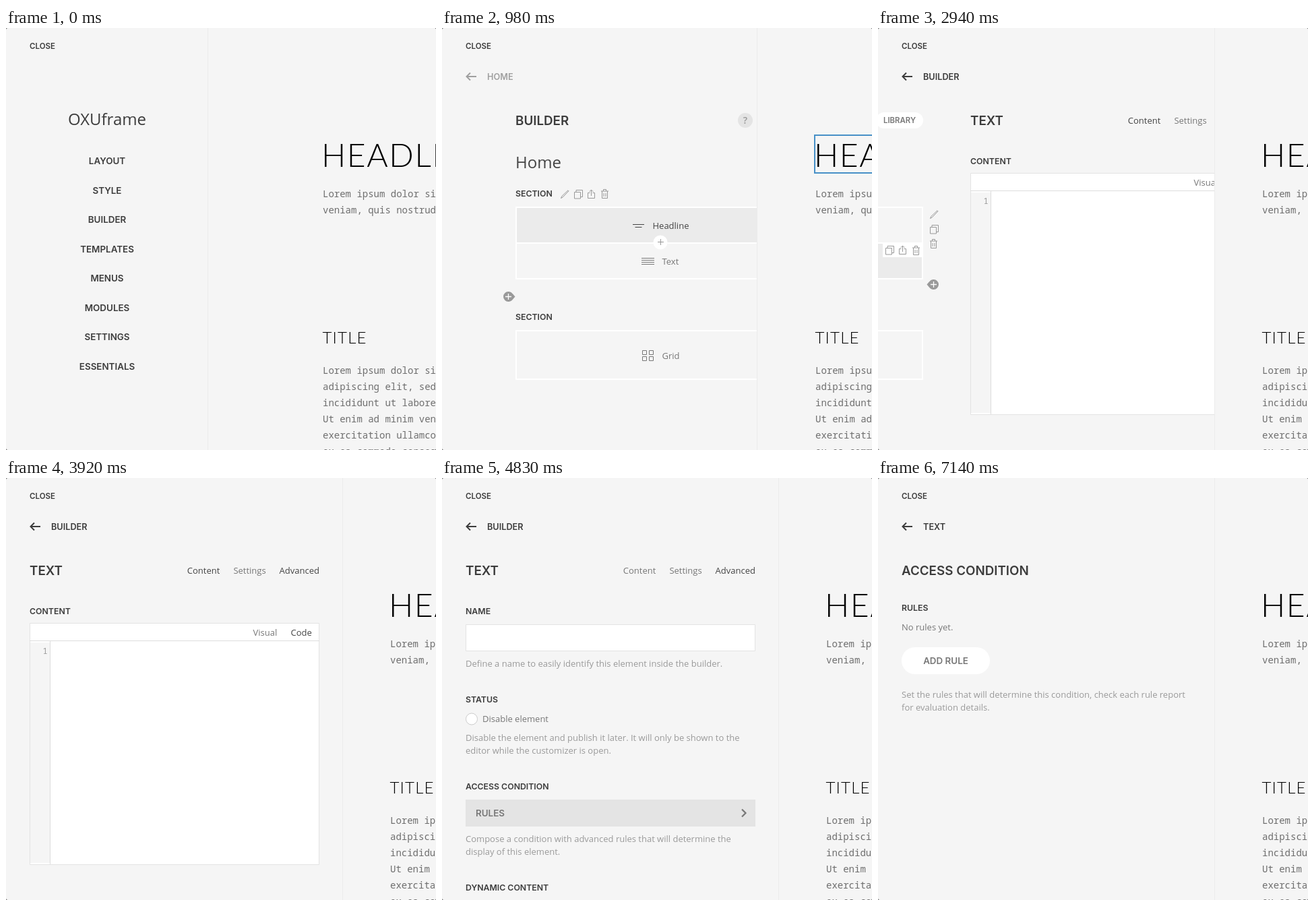
Recreate the animation shown at these times as an HTML page. Size 638 by 626 pixels, loop 8260 ms.

```html
<!DOCTYPE html>
<html lang="en">
<head>
<meta charset="utf-8">
<title>Builder sidebar</title>
<style>
  html, body { margin: 0; width: 100%; height: 100%; overflow: hidden; background: #666; }
  svg { display: block; width: 638px; height: 626px; background: #f5f5f5; border-radius: 3px; overflow: hidden; }
  text { font: 13px "Open Sans", sans-serif; fill: #777; white-space: pre; }
  .close, .back, .label, .title, .menu text, .button { font-family: Inter, sans-serif; font-weight: 600; fill: #3c3c3c; }
  .close { font-size: 11.5px; }
  .back { font-size: 12.7px; }
  .label { font-size: 12.3px; }
  .title { font-size: 18.8px; }
  .menu text, .button { font-size: 13.4px; text-anchor: middle; }
  .menu .brand { font: 24px "Open Sans", sans-serif; }
  .button { fill: #777; }
  .name { font-size: 24px; fill: #444; }
  .help { fill: #9a9a9a; }
  .dark { fill: #444; }
  .item { fill: currentColor; }
  .icon { fill: none; stroke: currentColor; }
  .gray { color: #999; }
  .field { fill: #fff; stroke: #e3e3e3; }
  .frame { fill: none; stroke: #fff; stroke-width: 2; }
  .outline { fill: none; stroke: #4790c7; stroke-width: 2; }
  .page text { font: 200 14px "Noto Sans Mono", monospace; fill: #6e6e6e; }
  .page .head { font: 300 48px Lato, sans-serif; letter-spacing: 1.6px; fill: #000; }
  .page .sub { font: 300 24px Lato, sans-serif; letter-spacing: 1.2px; fill: #000; }
</style>
</head>
<body>
<svg viewBox="0 0 638 626">
  <defs>
    <path id="pencil" class="icon" d="M.5 12.5 1.8 9.5 11 .8 12 1.8 3.200 11Z"/>
    <path id="copy" class="icon" d="M.5 3.5h9v9.500h-9zM3 3V.5h9.500V10.500H10"/>
    <path id="share" class="icon" d="M3.500 5.500h-3v8h10v-8h-3M5.500 10V1M2.500 4l3-3 3 3"/>
    <path id="trash" class="icon" d="M0 3h11M3.500 3V.5h4V3M1.500 3v10.500h8V3M4 6v5M7 6v5"/>
    <path id="plus" class="icon" d="M-4.500 0h9M0-4.500v9"/>
    <g id="badge">
      <path d="M10 0C7 3 5 7.500 0 7.500A7.500 7.500 0 0 1 0-7.500C5-7.500 7-3 10 0Z" fill="#999"/>
      <path d="M-4.500 0h9M0-4.500v9" stroke="#fff" stroke-width="1.300"/>
    </g>
    <g id="headlineItem">
      <path class="icon" d="M209 291.500h17M212.500 295.500h10"/>
      <text class="item" x="238.500" y="298">Headline</text>
    </g>
    <g id="textItem">
      <path class="icon" stroke-width="1.200" d="M222 341.500h19M222 344.500h19M222 347.500h19M222 350.500h19"/>
      <text class="item" x="252.500" y="351">Text</text>
    </g>
    <g id="itemTools" class="gray">
      <path fill="#fff" d="M405 267h58v20h-58z"/>
      <use href="#copy" x="409" y="270"/>
      <use href="#share" x="429" y="269"/>
      <use href="#trash" x="449" y="270"/>
      <circle cx="250" cy="318" r="10.500" fill="#fff"/>
      <use href="#plus" x="250.500" y="317.500"/>
    </g>
  </defs>

  <g id="menu" class="menu"><text class="brand" x="150" y="144">OXUframe</text></g>

  <g id="builder">
    <text class="title" x="35" y="143.500">BUILDER</text>
    <circle cx="376" cy="137" r="11" fill="#e4e4e4"/>
    <text class="help" x="376" y="142" text-anchor="middle" style="font-size:14px;font-weight:600">?</text>
    <rect x="395" y="125" width="70" height="24" rx="12" fill="#fff"/>
    <text class="button" x="430" y="141" style="font-size:11.400px">LIBRARY</text>
    <text class="name" x="35" y="208">Home</text>

    <text class="label" x="35" y="250">SECTION</text>
    <g class="gray">
      <use href="#pencil" x="102" y="240"/>
      <use href="#copy" x="122" y="240"/>
      <use href="#share" x="142" y="239"/>
      <use href="#trash" x="162" y="239"/>
      <use href="#pencil" x="475" y="270"/>
      <use href="#copy" x="475" y="292"/>
      <use href="#trash" x="475" y="313"/>
    </g>
    <g color="#777">
      <use href="#headlineItem"/>
      <use href="#textItem"/>
    </g>
    <path class="frame" d="M36 266h428v106h-428zM36 319h428"/>
    <g id="headlineHover" color="#444">
      <path fill="#ebebeb" d="M37 267h426v51h-426z"/>
      <use href="#headlineItem"/>
      <use href="#itemTools"/>
    </g>
    <g id="textHover" color="#444">
      <path fill="#ebebeb" d="M37 320h426v51h-426z"/>
      <use href="#textItem"/>
      <use href="#itemTools" y="53"/>
    </g>
    <use href="#badge" transform="translate(24.500 398.500)"/>
    <use href="#badge" transform="translate(480.500 380.500) scale(-1 1)"/>

    <text class="label" x="35" y="433">SECTION</text>
    <path class="frame" d="M36 449h428v72h-428z"/>
    <path class="icon" color="#777" d="M223.500 478.500h6v6h-6zM233.500 478.500h6v6h-6zM223.500 487.500h6v6h-6zM233.500 487.500h6v6h-6z"/>
    <text x="252.500" y="490.500">Grid</text>
  </g>

  <g id="element">
    <text class="title" x="35" y="143.500">TEXT</text>
    <text id="contentLink" x="268.800" y="141.500">Content</text>
    <text x="337.400" y="141.500">Settings</text>
    <text id="advancedLink" x="405.600" y="141.500">Advanced</text>

    <g id="contentTab">
      <text class="label" x="35" y="202">CONTENT</text>
      <path class="field" d="M35.500 215.500h429v358h-429z"/>
      <path fill="#f5f5f5" d="M36 244h29v327h-29z"/>
      <path stroke="#ddd" d="M35 241.500h430M65.500 242v331"/>
      <text x="366.500" y="233.500">Visual</text>
      <text class="dark" x="422.500" y="233.500">Code</text>
      <text class="help" x="54.500" y="261" style="font:12px 'Noto Sans Mono',monospace">1</text>
    </g>

    <g id="advancedTab">
      <text class="label" x="35" y="202">NAME</text>
      <path class="field" d="M35.500 217.500h429v39h-429z"/>
      <text class="help" x="35" y="279.500">Define a name to easily identify this element inside the builder.</text>
      <text class="label" x="35" y="332.500">STATUS</text>
      <circle cx="44" cy="357.500" r="8.500" fill="#fff" stroke="#ccc"/>
      <text x="60" y="362">Disable element</text>
      <text class="help" x="35" y="389.500">Disable the element and publish it later. It will only be shown to the</text>
      <text class="help" x="35" y="409">editor while the customizer is open.</text>
      <text class="label" x="35" y="462">ACCESS CONDITION</text>
      <path fill="#e4e4e4" d="M35 477h430v40h-430z"/>
      <text id="rules" class="button" x="50" y="502" style="text-anchor:start">RULES</text>
      <path class="icon" color="#777" stroke-width="2.200" d="M445 491.500l5.500 5.500-5.500 5.500"/>
      <text class="help" x="35" y="539.500">Compose a condition with advanced rules that will determine the</text>
      <text class="help" x="35" y="559">display of this element.</text>
      <text class="label" x="35" y="612">DYNAMIC CONTENT</text>
    </g>
  </g>

  <g id="access">
    <text class="title" x="35" y="143.500">ACCESS CONDITION</text>
    <text class="label" x="35" y="196.500">RULES</text>
    <text x="35" y="226">No rules yet.</text>
    <rect x="35" y="251" width="131" height="40" rx="20" fill="#fff"/>
    <text class="button" x="100.500" y="276">ADD RULE</text>
    <text class="help" x="35" y="325.500">Set the rules that will determine this condition, check each rule report</text>
    <text class="help" x="35" y="345">for evaluation details.</text>
  </g>

  <text class="close" x="35" y="31">CLOSE</text>
  <g id="header">
    <path class="icon" color="#3c3c3c" stroke-width="2" d="M51 72H36.500M42 66.500 36.500 72l5.500 5.500"/>
    <text id="back" class="back" x="67" y="76.500"></text>
  </g>

  <g id="page" class="page">
    <path fill="#f5f5f5" d="M299 0h400v626h-400z"/>
    <path stroke="#ebebeb" d="M299.500 0v626"/>
    <g id="article">
      <text class="head" x="468" y="206">HEADLINE</text>
      <text class="sub" x="469.500" y="468">TITLE</text>
      <path id="headlineOutline" class="outline" d="M469 159h300v56h-300z"/>
      <path id="textOutline" class="outline" d="M469 233h300v50h-300z"/>
    </g>
  </g>
</svg>

<script>
const LOOP = 8260, STEP = 70;
const el = Object.fromEntries([...document.querySelectorAll('svg [id]')].map(node => [node.id, node]));

function addText(parent, x, y, content) {
  const node = document.createElementNS('http://www.w3.org/2000/svg', 'text');
  node.setAttribute('x', x);
  node.setAttribute('y', y);
  node.textContent = content;
  parent.append(node);
  return node;
}

const menuItems = ['LAYOUT', 'STYLE', 'BUILDER', 'TEMPLATES', 'MENUS', 'MODULES', 'SETTINGS', 'ESSENTIALS']
  .map((label, i) => addText(el.menu, 150, 202 + 43.5 * i, label));

const addLines = (y, lines) => lines.forEach((line, i) => addText(el.article, 470, y + 24 * i, line));
addLines(251, ['Lorem ipsum dolor sit amet', 'veniam, quis nostrud']);
addLines(513, ['Lorem ipsum dolor sit', 'adipiscing elit, sed', 'incididunt ut labore',
  'Ut enim ad minim veniam', 'exercitation ullamco', 'ex ea commodo consequat']);

const progress = (t, start, duration) => Math.min(1, Math.max(0, (t - start) / duration));
const easeOut = x => 1 - (1 - x) ** 3;
const place = (node, x, opacity = 1) => {
  node.setAttribute('transform', `translate(${Math.round(x)} 0)`);
  node.style.opacity = opacity;
};
const tone = (node, from, to, amount) => {
  const level = from + (to - from) * amount;
  node.style.fill = `rgb(${level} ${level} ${level})`;
};

function render(t) {
  const open = easeOut(progress(t, 770, 458));
  const toElement = easeOut(progress(t, 2800, 340));
  const toAccess = easeOut(progress(t, 6860, 270));
  const width = 300 + 200 * open;

  // Sidebar panels push each other to the left while the sidebar widens.
  place(el.page, 200 * open);
  place(el.article, -100 * open);
  place(el.menu, -width * open);
  place(el.builder, width * (1 - open) - 500 * toElement, open > 0 ? 1 : 0);
  place(el.element, 500 * (1 - toElement - toAccess));
  place(el.access, 500 * (1 - toAccess));

  el.header.style.opacity = progress(t, 770, 458);
  el.back.textContent = t < 2800 ? 'HOME' : t < 6860 ? 'BUILDER' : 'TEXT';
  tone(menuItems[2], 60, 119, t >= 350 ? 1 : 0);

  // Hover moves from the headline item to the text item.
  const toText = progress(t, 1680, 140);
  const previewing = t >= 770 && t < 2800;
  el.headlineHover.style.opacity = 1 - toText;
  el.textHover.style.opacity = toText;
  el.headlineOutline.style.opacity = previewing ? 1 - toText : 0;
  el.textOutline.style.opacity = previewing ? toText : 0;

  const leave = progress(t, 4530, 150), enter = progress(t, 4680, 150);
  place(el.contentTab, -50 * leave, 1 - leave);
  place(el.advancedTab, 50 * (1 - enter), enter);
  tone(el.contentLink, 68, 119, t >= 4550 ? 1 : 0);
  tone(el.advancedLink, 119, 68, t >= 3920 ? 1 : 0);
  tone(el.rules, 119, 60, progress(t, 6020, 140));
}

function tick() {
  const t = performance.now() % LOOP;
  render(Math.floor(t / STEP) * STEP);
  requestAnimationFrame(tick);
}
tick();
</script>
</body>
</html>
```
